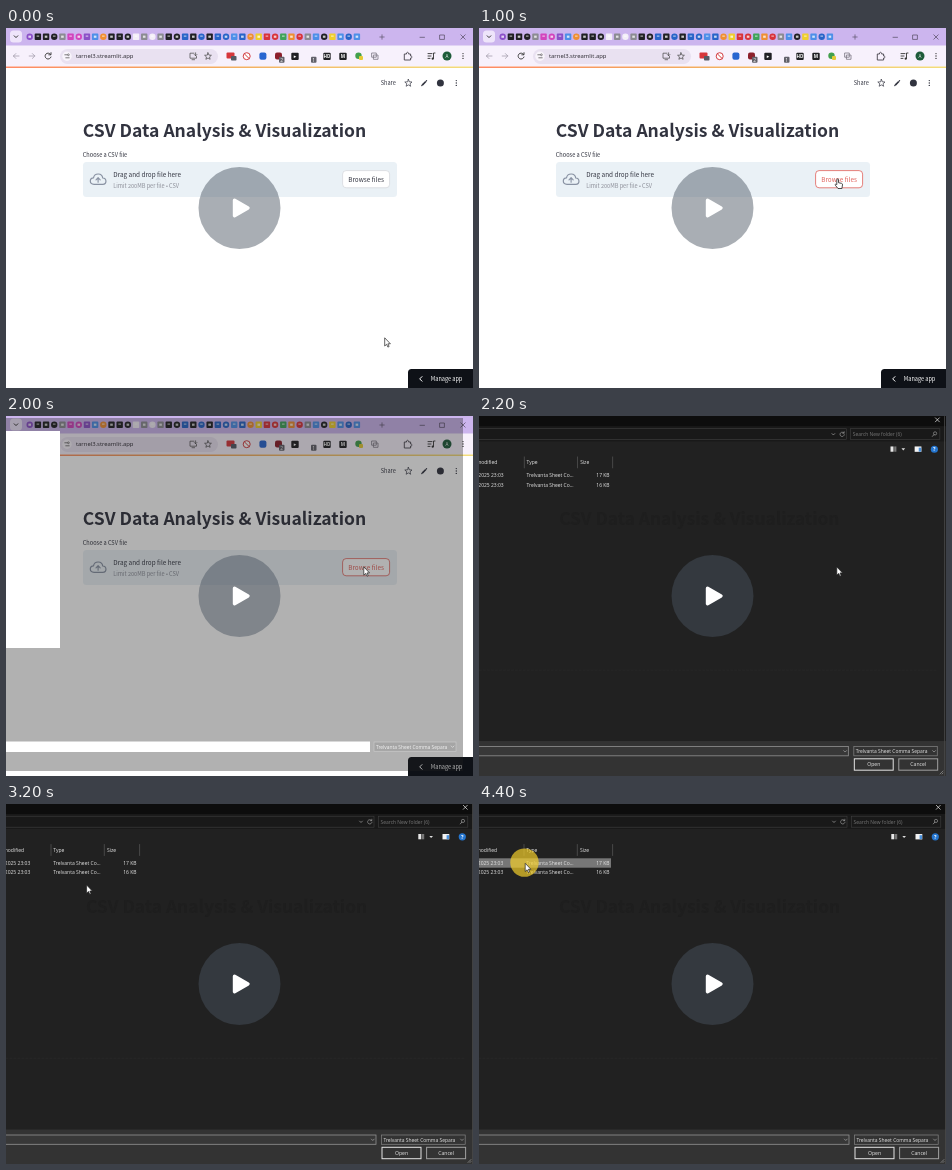
These frames come from a looping animation (467x360 px, 4.6 s). An HTML page:

```html
<!DOCTYPE html>
<html lang="en">
<head>
<meta charset="utf-8">
<title>CSV upload demo</title>
<style>
  html, body { margin: 0; width: 100%; height: 100%; overflow: hidden; background: #fff; }
  svg { display: block; width: 100vw; height: 100vh; }
  text { white-space: pre; }
  .page { font-family: "Noto Sans CJK JP", "Noto Sans CJK SC", "Noto Sans CJK", "Open Sans", sans-serif; fill: #31333f; }
  .ui { font-family: "Open Sans", "Noto Sans", sans-serif; }
  .line { fill: none; stroke-linecap: round; stroke-linejoin: round; }
</style>
</head>
<body>
<svg id="stage" viewBox="0 0 467 360"></svg>
<script>
const LOOP = 4600;
const stage = document.getElementById('stage');

const rect = (x, y, w, h, fill, more = '') =>
  `<rect x="${x}" y="${y}" width="${w}" height="${h}" fill="${fill}" ${more}/>`;
const disc = (x, y, r, fill, more = '') =>
  `<circle cx="${x}" cy="${y}" r="${r}" fill="${fill}" ${more}/>`;
const line = (d, color, width = 0.8, more = '') =>
  `<path class="line" d="${d}" stroke="${color}" stroke-width="${width}" ${more}/>`;
const text = (x, y, size, str, more = '') =>
  `<text x="${x}" y="${y}" font-size="${size}" ${more}>${str}</text>`;
const dots = (x, y, color) => [-2.4, 0, 2.4].map(d => disc(x, y + d, 0.7, color)).join('');
const star = (x, y, r, color) => {
  const pts = Array.from({ length: 10 }, (_, i) => {
    const a = i * Math.PI / 5 - Math.PI / 2, k = i % 2 ? r * 0.45 : r;
    return `${(x + k * Math.cos(a)).toFixed(2)} ${(y + k * Math.sin(a)).toFixed(2)}`;
  });
  return line(`M${pts.join('L')}Z`, color, 0.7);
};

function tabStrip() {
  const colors = { k: '#202024', g: '#8b8b92', w: '#f3eef8', m: '#d244bd', p: '#8b50c8', b: '#2864c8',
    s: '#4d8fe8', o: '#ef8f32', r: '#d8333a', y: '#efcf2c', n: '#3fa35a', c: '#3c3f8f' };
  const icons = 'pkkkgmmpsokkkwgwgkkbkbkbbsboyrrnorgskysbs';
  let s = rect(0, 0, 467, 18, '#ccb5ee') + rect(4, 2.5, 12, 12, '#eee4fa', 'rx="3.5"') +
    line('M8.2 7.8L10 9.6L11.8 7.8', '#333', 1);
  [...icons].forEach((key, i) => {
    const x = 20.5 + i * 8.18;
    s += rect(x, 5.6, 6.4, 6.4, colors[key], `rx="${i % 3 ? 0.8 : 3.2}"`);
    s += rect(x + 1.9, 7.6, 2.6, i % 2 ? 1 : 2.2, '#fff', 'opacity=".75"');
  });
  return s + line('M373.8 9H378.2M376 6.8V11.2', '#5d536b', 0.7) +
    line('M414 9.3H418.5', '#51485e', 0.7) +
    line('M434 7H438.4V11.4H434Z', '#51485e', 0.7) +
    line('M454.8 6.8L459.2 11.2M459.2 6.8L454.8 11.2', '#51485e', 0.7);
}

function extensions() {
  const badge = (x, n) => rect(x, 28.8, 5.5, 6, '#62616a', 'rx="1"') +
    text(x + 2.75, 33.6, 5, n, 'class="ui" fill="#fff" text-anchor="middle"');
  const tile = (x, str) => rect(x - 3.7, 24.7, 7.4, 7.2, '#202024', 'rx="1"') +
    text(x, 30.2, 4.6, str, 'class="ui" fill="#fff" text-anchor="middle" font-weight="700"');
  return rect(220.5, 24.6, 8, 5.8, '#d6373c', 'rx="1"') + rect(225, 28, 5.5, 4.5, '#555b66', 'rx=".8"') +
    disc(240.7, 28.2, 3.5, '#fff', 'stroke="#d33b40" stroke-width="1"') + line('M238.5 26L243 30.4', '#d33b40', 1) +
    rect(253.4, 24.6, 7, 7.2, '#2865d0', 'rx="2"') +
    rect(269, 24.5, 7, 7, '#8c1f2b', 'rx="2"') + badge(273, '2') +
    tile(289, '▸') + badge(305, '1') + tile(321, 'HD') + tile(337, 'M') +
    disc(352.5, 27.8, 3.2, '#43a04c') + rect(353, 28, 4, 4, '#e5ca36', 'rx="1"') +
    line('M366 25H370.3V29.2H366ZM367.8 27H372V31.3H367.8Z', '#7b7783', 0.8) +
    line('M398.7 26H400.5C400 23.8 403 23.8 402.6 26H404.6V28C406.4 27.7 406.4 30.4 404.6 30V32H398.7Z', '#44414a', 0.9) +
    line('M422 25.6H426M422 28H425M422 30.4H424M427.5 30.5V25H429', '#333', 0.9) +
    disc(426.7, 30.7, 1.1, '#333') + disc(441, 28, 4.5, '#1e5b3a') +
    text(441, 29.7, 4.6, 'A', 'class="ui" fill="#fff" text-anchor="middle"') + dots(457, 28, '#333');
}

function browser() {
  return tabStrip() + rect(0, 17.5, 467, 21, '#f7f1fc') +
    line('M13 28H7.4M9.8 25.6L7.4 28L9.8 30.4', '#a39dab') +
    line('M23.2 28H28.8M26.4 25.6L28.8 28L26.4 30.4', '#a39dab') +
    line('M44.5 26.2A3 3 0 1 0 45 29M45 24.7V26.8H42.8', '#333', 0.9) +
    rect(54, 21, 158, 15, '#e9e1f1', 'rx="7.5"') + disc(61, 28.3, 4.7, '#f8f4fb') +
    line('M58.8 26.8H61M59.8 29.8H63.2', '#444', 0.7) +
    disc(62.4, 26.8, 0.9, 'none', 'stroke="#444" stroke-width=".6"') +
    text(70, 30.4, 5.9, 'tarnel3.streamlit.app', 'class="ui" fill="#29272e"') +
    line('M188 25.2H184V30.2H190.5V28.5M186 31.7H188.6M189.6 24.8V27.6M188.3 26.5L189.6 27.8L190.9 26.5', '#444', 0.7) +
    star(202, 28.4, 3.6, '#444') + extensions() + rect(0, 38.5, 467, 1.5, 'url(#deco)');
}

function page() {
  return rect(0, 0, 467, 360, '#fff') + browser() + `<g class="page">` +
    text(374.7, 57, 5.6, 'Share') + star(402.4, 55.2, 3.8, '#31333f') +
    line('M416.5 56.8L419.8 53.5', '#31333f', 1.7, 'style="stroke-linecap:butt"') +
    line('M415.8 57.5L416.6 56.7M420.1 53.2L420.6 52.7', '#31333f', 1.2) +
    disc(434.4, 55, 3.5, '#31333f') + dots(450.3, 55, '#31333f') +
    text(76.8, 109, 17.55, 'CSV Data Analysis &amp; Visualization', 'font-weight="700"') +
    text(76.8, 129, 5.6, 'Choose a CSV file') +
    rect(77, 134, 314, 35, '#eaf1f6', 'rx="3.5"') +
    line('M88 156.3C83 156 83.3 149.8 87.5 149.8C88.6 144.6 96.1 144.8 96.7 150C101 150.2 101 156.2 96.8 156.3Z', '#8992a3', 1.2) +
    line('M92.1 154.2V149.8M90 151.8L92.1 149.7L94.2 151.8', '#8992a3', 1.1) +
    text(107.3, 149, 6.38, 'Drag and drop file here') +
    text(107.3, 159.6, 5.58, 'Limit 200MB per file • CSV', 'fill="#8b8d97"') +
    rect(336.6, 142.6, 47, 17.2, '#fff', 'id="browse" rx="3.5" stroke-width=".8"') +
    text(360.1, 153.5, 6.38, 'Browse files', 'id="browseText" text-anchor="middle"') +
    `<path d="M402 360V344.5Q402 341 405.5 341H467V360Z" fill="#0e1117"/>` +
    line('M416 348.6L413.7 350.9L416 353.2', '#fff', 1) +
    text(424.8, 353, 5.55, 'Manage app', 'fill="#fff" font-weight="500"') + `</g>`;
}

// The file dialog while it is still fading in
function fadeIn() {
  return rect(0, 2, 457, 353, '#202020', 'opacity=".35"') +
    rect(0, 15, 54, 217, '#fff') + rect(0, 325.5, 364, 10.5, '#fff') +
    rect(368, 326, 82, 9.3, '#a5a5a5', 'stroke="#c9c9c9" stroke-width=".7"') +
    text(370, 332.7, 4.9, 'Trelvanta Sheet Comma Separa', 'class="ui" fill="#f5f5f5"') +
    line('M445.2 330L446.6 331.4L448 330', '#eee', 0.6);
}

function dialog() {
  const row = (y, size) => text(24.3, y, 5, '2025 23:03', 'text-anchor="end"') +
    text(47.3, y, 5, 'Trelvanta Sheet Co...') + text(130.5, y, 5, size, 'text-anchor="end"');
  const caret = (x, y) => line(`M${x - 1.4} ${y - 0.7}L${x} ${y + 0.7}L${x + 1.4} ${y - 0.7}`, '#bbb', 0.6);
  const button = (x, w, str, border) => rect(x, 343.3, w, 11.4, '#333', `stroke="${border}" stroke-width="1"`) +
    text(x + w / 2, 350.9, 5.1, str, 'text-anchor="middle"');
  return rect(-2, -2, 471, 364, '#212121') + rect(-2, -2, 471, 12, '#0d0d0d') +
    rect(-2, 10, 471, 15, '#191919') + rect(-2, 325.5, 471, 37, '#333') +
    line('M457.3 1.3L461.3 5.3M461.3 1.3L457.3 5.3', '#eee', 0.7) +
    rect(-3, 12.2, 371, 11, '#191919', 'stroke="#404040" stroke-width=".6"') +
    rect(372.3, 12.2, 89.5, 11, '#191919', 'stroke="#404040" stroke-width=".6"') +
    caret(355, 17.8) + line('M365.5 16.4A2.2 2.2 0 1 0 366 18.2M365.8 15.2V16.7H364.3', '#aaa', 0.6) +
    disc(457, 16.9, 1.6, 'none', 'stroke="#aaa" stroke-width=".6"') + line('M455.8 18.2L454.3 19.9', '#aaa', 0.7) +
    `<g class="ui" fill="#e6e6e6">` + text(374.5, 19.6, 4.95, 'Search New folder (6)', 'fill="#777"') +
    rect(412.3, 30, 3, 5.3, '#e8e8e8') + rect(416, 30, 2.2, 5.3, '#777') +
    `<path d="M423.3 31.9H427L425.1 34Z" fill="#ddd"/>` +
    rect(436.5, 30, 6.8, 5.4, '#f2f2f2') + rect(440.6, 31.2, 2.4, 4, '#4a91dc') +
    disc(456.3, 32.8, 3.6, '#2475cf') +
    text(456.3, 34.9, 5.4, '?', 'fill="#fff" text-anchor="middle" font-weight="700"') +
    rect(-2, 54.3, 134, 9.4, '#777', 'id="row"') +
    text(18, 47.6, 5, 'modified', 'text-anchor="end"') + text(47.3, 47.6, 5, 'Type') + text(101, 47.6, 5, 'Size') +
    line('M45 40.5V51.5M98.3 40.5V51.5M133.6 40.5V51.5', '#5a5a5a', 0.7) +
    row(60.8, '17 KB') + row(70.3, '16 KB') +
    text(80, 108.5, 17.4, 'CSV Data Analysis &amp; Visualization', 'class="page" font-weight="700" style="fill:#1e1e1e"') +
    line('M0 254.3H459', '#2b2b2b', 0.6, 'stroke-dasharray="2 2"') +
    rect(-3, 331, 373, 9.3, '#383838', 'stroke="#929292" stroke-width=".8"') + caret(366.8, 335.8) +
    rect(375.5, 331, 83.7, 9.3, '#333', 'stroke="#858585" stroke-width=".7"') + caret(456, 335.8) +
    text(377.4, 337.6, 4.95, 'Trelvanta Sheet Comma Separa') +
    button(376, 39, 'Open', '#e4e4e4') + button(420.6, 39, 'Cancel', '#a0a0a0') + `</g>` +
    line('M466.5 0V360', '#4b4b4b', 0.8) + line('M462 358.5L465 355.5M464 358.5L465 357.5', '#aaa', 0.6);
}

const arrow = '<path d="M0 0V8.2L1.9 6.5L3.2 9.3L4.4 8.7L3.2 6H5.7Z" fill="#fff" stroke="#222" stroke-width=".7" stroke-linejoin="round"/>';
const hand = '<path d="M0 .9C0 -.4 1.7 -.4 1.7 .9V3.8L4.9 4.5Q5.9 4.8 5.7 6L5.1 9.6H1.2L-1.5 6.3C-2 5.4 -1 4.7 0 5.8Z" fill="#fff" stroke="#222" stroke-width=".8" stroke-linejoin="round"/>';
const busy = disc(6.4, 1, 2.5, '#cfe4f6', 'stroke="#2f7fd0" stroke-width="1.7"');

stage.innerHTML = `<defs><linearGradient id="deco"><stop stop-color="#ff8a65"/>
  <stop offset=".4" stop-color="#f3a65e"/><stop offset="1" stop-color="#f3dd7c"/></linearGradient></defs>
  <g id="page">${page()}</g><g id="fade">${fadeIn()}</g><g id="dialog">${dialog()}</g>
  <g id="cursor">${disc(-0.7, -0.7, 14.2, '#f4ce2b', 'id="click" fill-opacity=".7"')}
  <g id="arrow">${arrow}</g><g id="hand">${hand}</g><g id="busy">${busy}</g></g>
  <g id="play">${disc(233.5, 180, 41, '#4a5460', 'fill-opacity=".47"')}
  <path d="M228.5 172.3L242 180L228.5 187.7Z" fill="#fff" stroke="#fff" stroke-width="3.4" stroke-linejoin="round"/></g>`;

const el = id => document.getElementById(id);
const show = (id, on) => el(id).setAttribute('visibility', on ? 'visible' : 'hidden');
const within = (t, a, b) => t >= a && t < b;

const stops = [[0, 378.7, 309.8], [400, 390, 271.5], [600, 380.5, 190.5], [800, 365.5, 165.5],
  [1000, 357.8, 150.9], [2800, 230.5, 117.5], [3200, 80.6, 81], [3600, 48, 60], [3800, 46.2, 59.3]];

function draw(t) {
  const [, x, y] = stops.filter(s => s[0] <= t).pop();
  const open = t >= 2200, hover = within(t, 1000, 2200), pointing = within(t, 1000, 1800);
  show('page', !open);
  show('fade', within(t, 2000, 2200));
  show('dialog', open);
  // The window pops in a touch smaller than its final size
  el('dialog').setAttribute('transform', t < 2400 ? 'translate(150 180) scale(.997) translate(-150 -180)' : '');
  show('row', t >= 3600);
  el('row').setAttribute('fill', t < 4000 ? '#4d4d4d' : '#777');

  el('browse').setAttribute('stroke', hover ? '#e0605a' : '#d6d8dd');
  el('browseText').setAttribute('fill', hover ? '#e0605a' : '#31333f');

  el('cursor').setAttribute('transform', `translate(${x} ${y})`);
  show('click', within(t, 1400, 1800) || t >= 4200);
  show('arrow', !pointing);
  show('hand', pointing);
  show('busy', within(t, 1800, 2000));
}

function tick() {
  draw(performance.now() % LOOP);
  requestAnimationFrame(tick);
}
tick();
</script>
</body>
</html>
```
